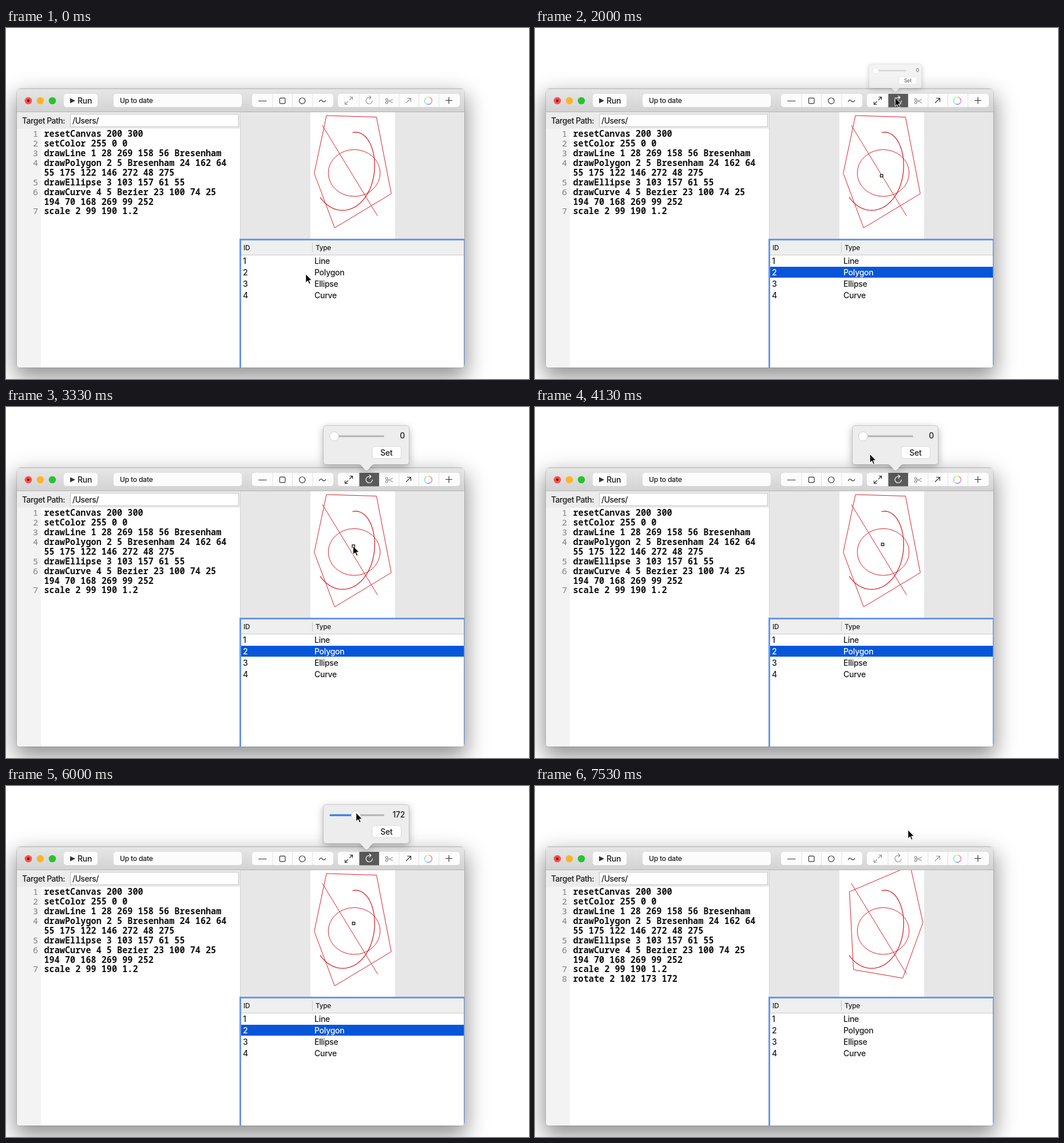
An HTML page for the animation above (8270 ms loop, 914 px wide and 613 px high).

```html
<!DOCTYPE html>
<html lang="en">
<head>
<meta charset="utf-8">
<title>Rotate a polygon</title>
<style>
  html, body { margin: 0; width: 100%; height: 100%; overflow: hidden; background: #fff; }
  svg { display: block; position: absolute; left: 0; top: 0; }
  text { font: 450 14px Inter, sans-serif; letter-spacing: -.02em; fill: #1c1c1c; white-space: pre; }
  .small { font-size: 12.2px; }
  .head { font-size: 11.7px; }
  .label { letter-spacing: -.035em; }
  .code text { font: 600 15.2px "Noto Sans Mono", monospace; letter-spacing: 0; fill: #101010; }
  .code .num { fill: #808080; font-weight: 500; }
  .end { text-anchor: end; }
  .mid { text-anchor: middle; }
  .window { position: absolute; left: 19px; top: 106px; width: 782px; height: 487px; border-radius: 6px;
    box-shadow: 0 0 0 .6px rgba(0,0,0,.22), 0 15px 37px 4px rgba(0,0,0,.42); }
  .button { fill: #fcfcfc; filter: drop-shadow(0 .6px .5px rgba(0,0,0,.3)); }
  .icon { fill: none; stroke: #333; stroke-width: 1.2; stroke-linecap: round; stroke-linejoin: round; }
  .drawing * { fill: none; stroke: #dc1f26; stroke-width: 1; vector-effect: non-scaling-stroke; }
  .bubble { fill: #ededed; stroke: rgba(0,0,0,.2); stroke-width: .8; filter: drop-shadow(0 4px 7px rgba(0,0,0,.3)); }
</style>
</head>
<body>
<div class="window"></div>
<svg id="stage" width="914" height="613" viewBox="0 0 914 613">
  <defs>
    <linearGradient id="bar" x2="0" y2="1"><stop stop-color="#e7e7e7"/><stop offset="1" stop-color="#d2d2d2"/></linearGradient>
    <linearGradient id="blue" x2="0" y2="1"><stop stop-color="#4d90f3"/><stop offset="1" stop-color="#1d62dd"/></linearGradient>
    <clipPath id="frame"><rect x="19" y="106" width="782" height="487" rx="5.5"/></clipPath>
    <clipPath id="paper"><rect x="532" y="147" width="148" height="221"/></clipPath>
  </defs>

  <g clip-path="url(#frame)">
    <rect x="19" y="106" width="782" height="487" fill="#fff"/>
    <rect x="19" y="106" width="782" height="41" fill="url(#bar)"/>
    <path d="M22 106.5H798" stroke="#c4c4c4"/>
    <rect x="19" y="147" width="391" height="29" fill="#ececec"/>
    <rect x="19" y="176" width="42" height="417" fill="#f3f3f3"/>
    <rect x="410" y="147" width="391" height="222" fill="#e7e7e7"/>
    <path d="M409.5 147V593" stroke="#d2d2d2"/>
    <path d="M19 146.5H801" stroke="#b4b4b4"/>

    <circle cx="39" cy="127" r="6.3" fill="#fc4f4c"/><circle cx="39" cy="127" r="2.2" fill="#740806"/>
    <circle cx="60" cy="127" r="6.3" fill="#fdb42c"/>
    <circle cx="81" cy="127" r="6.3" fill="#28c232"/>

    <g class="button">
      <rect x="101" y="115" width="59" height="23" rx="4"/>
      <rect x="188" y="115" width="224" height="23" rx="4"/>
      <rect x="430" y="115" width="142" height="23" rx="4"/>
      <rect x="580" y="115" width="213" height="23" rx="4"/>
    </g>
    <path d="M466 115V138M500.5 115V138M536 115V138M617 115V138M652 115V138M687 115V138M721.5 115V138M756.5 115V138" stroke="#e2e2e2"/>
    <path d="M112 122.5L121 127L112 131.5Z" fill="#333"/>
    <text x="125" y="132">Run</text>
    <text id="status" class="small" x="199" y="131.3"></text>

    <g id="tools" class="icon">
      <path d="M441.5 127.5H455"/>
      <rect x="478.3" y="122.3" width="9.6" height="9.6" rx="1.5"/>
      <circle cx="517.7" cy="127.2" r="5.2"/>
      <path d="M547.5 128.5C549.5 124.5 551.5 126 553 127.5S556.8 130 558.8 126.5"/>
      <path d="M768.5 126.5H779.5M774 121V132"/>
      <g id="wheel" stroke-width="1.8" stroke-linecap="butt"></g>
    </g>
    <rect id="pressed" x="617.5" y="115" width="34.5" height="23.5" fill="#5a5a5a"/>
    <g id="edit" class="icon">
      <path d="M600.5 125.5L605 121M601 120.5H605.5V125M597.5 128.5L593 133M592.5 129V133.5H597"/>
      <path d="M699.5 130.5L707 123M701.5 122.5H707.5V128.5"/>
    </g>
    <g id="turn" class="icon"><path d="M640.3 127A5.6 5.6 0 1 1 634.8 121.3H637.5M635 118.5L638 121.3L635 124.2"/></g>
    <g class="icon" opacity=".5">
      <circle cx="665.3" cy="124.8" r="1.9"/><circle cx="665.3" cy="130.2" r="1.9"/>
      <path d="M667 125.7L675.5 130.5M667 129.3L675.5 124.5"/>
    </g>

    <text class="label" x="28" y="166.5">Target Path:</text>
    <rect x="112.5" y="150.5" width="294" height="22" fill="#fff" stroke="#c3c3c3"/>
    <text class="label" x="116" y="166.5">/Users/</text>
    <g id="code" class="code"></g>

    <rect x="532" y="147" width="148" height="222" fill="#fff"/>
    <g clip-path="url(#paper)"><g class="drawing" transform="translate(532 369.9) scale(.743 -.743)">
      <path d="M28 269L158 56"/>
      <polygon id="polygon" points="24,162 64,55 175,122 146,272 48,275"/>
      <ellipse cx="103" cy="157" rx="61" ry="55"/>
      <path id="curve" style="stroke-width:1.3"/>
    </g></g>
    <rect id="anchor" x="-2.2" y="-2.2" width="4.4" height="4.4" fill="#fff" stroke="#111" stroke-width="1.3"/>
    <g id="veil">
      <rect x="410" y="147" width="391" height="222" fill="#000" opacity=".21"/>
      <text class="mid" x="605.3" y="263">Update Required</text>
    </g>

    <rect x="410" y="369" width="391" height="224" fill="#fff"/>
    <rect x="410" y="370" width="391" height="26" fill="#efefef"/>
    <path d="M410 396.5H801M535.5 375V392" stroke="#c9c9c9"/>
    <text class="head" x="415" y="387.5">ID</text>
    <text class="head" x="541" y="387.5">Type</text>
    <g id="rows"></g>
    <rect x="409.5" y="369.5" width="392" height="240" fill="none" stroke="#6797eb" stroke-width="3"/>
  </g>

  <g id="popover">
    <path class="bubble" d="M560 32.5H699Q704.5 32.5 704.5 38V95Q704.5 100.5 699 100.5H643C638 100.5 634 111.5 630 111.5S622 100.5 617 100.5H560Q554.5 100.5 554.5 95V38Q554.5 32.5 560 32.5Z"/>
    <path d="M567 51H659.5" stroke="#b3b3b3" stroke-width="3" stroke-linecap="round"/>
    <path id="fill" stroke="#307bf3" stroke-width="3" stroke-linecap="round"/>
    <circle id="knob" cy="51.3" r="8" fill="#fff" stroke="#c6c6c6" stroke-width=".8"/>
    <text id="value" class="end" x="697" y="55"></text>
    <rect id="setBox" x="640" y="69" width="50.5" height="21" rx="4" stroke-width=".8"/>
    <text id="setText" class="mid" x="664.8" y="84.5">Set</text>
  </g>

  <path id="cursor" d="M-.7 -.5V14.8L2.9 11.5L5.3 17.1L7.7 16.1L5.3 10.7H9.9Z" fill="#000" stroke="#fff" stroke-width="1"/>
</svg>

<script>
const LOOP = 8270, STEP = 200 / 3;
const SELECT = 200, OPEN = 1930, GRAB = 2870, DRAG_END = 3400,
      SLIDE = 4470, PRESS = 6600, OUTDATED = 6730, UPDATED = 6930, CLOSED = 7060;

const cursorKeys = [
  [870, 524.5, 430], [1130, 560, 310], [1400, 627, 103], [1660, 630, 122], [2130, 630, 122],
  [2400, 616, 185], [2600, 610, 222], [GRAB, 606, 258], [3000, 606, 258], [DRAG_END, 607.5, 240],
  [3660, 607, 232], [3930, 594, 130], [4130, 586, 83], [4400, 574, 48], [SLIDE, 574, 48],
  [4800, 580, 48], [5400, 604, 47], [5860, 612.5, 47], [6130, 612.5, 47], [6300, 633, 61], [6530, 652.5, 77]
];
const popoverKeys = [
  [OPEN - 60, .3, 0], [OPEN, .38, .25], [2000, .615, .62], [2066, .95, .9], [2133, 1.04, 1], [2260, 1, 1],
  [6860, 1, 1], [CLOSED, 1, 0]
];

const $ = id => document.getElementById(id);
const set = (id, attrs) => { for (const k in attrs) $(id).setAttribute(k, attrs[k]); };
const show = (id, on) => { $(id).style.display = on ? "" : "none"; };

function sample(keys, t) {
  const next = keys.findIndex(k => k[0] > t);
  if (next === 0) return keys[0].slice(1);
  if (next < 0) return keys[keys.length - 1].slice(1);
  const a = keys[next - 1], b = keys[next], p = (t - a[0]) / (b[0] - a[0]);
  return a.slice(1).map((v, i) => v + (b[i + 1] - v) * p);
}

function bezierPoint(points, u) {
  while (points.length > 1)
    points = points.slice(1).map((p, i) => p.map((v, k) => points[i][k] * (1 - u) + v * u));
  return points[0];
}

function build() {
  const control = [[23, 100], [74, 25], [194, 70], [168, 269], [99, 252]];
  set("curve", { d: "M" + Array.from({ length: 61 }, (_, i) => bezierPoint(control, i / 60).join(" ")).join("L") });

  const lines = [
    "1|resetCanvas 200 300", "2|setColor 255 0 0", "3|drawLine 1 28 269 158 56 Bresenham",
    "4|drawPolygon 2 5 Bresenham 24 162 64", "|55 175 122 146 272 48 275",
    "5|drawEllipse 3 103 157 61 55", "6|drawCurve 4 5 Bezier 23 100 74 25",
    "|194 70 168 269 99 252", "7|scale 2 99 190 1.2", "8|rotate 2 102 173 172"
  ];
  $("code").innerHTML = lines.map((line, i) => {
    const [num, code] = line.split("|"), y = 190.2 + i * 16.9;
    return `<g><text class="num end" x="56" y="${y}">${num}</text><text x="66.5" y="${y}">${code}</text></g>`;
  }).join("");
  $("code").lastChild.id = "newLine";

  $("rows").innerHTML = '<rect id="selection" x="411" y="417" width="390" height="19" fill="#0756d9"/>' +
    ["Line", "Polygon", "Ellipse", "Curve"].map((type, i) => {
      const y = 412 + i * 20;
      return `<g id="row${i}"><text x="414" y="${y}">${i + 1}</text><text x="539" y="${y}">${type}</text></g>`;
    }).join("");

  const rim = a => `${738 + 6.4 * Math.sin(a)} ${127 - 6.4 * Math.cos(a)}`;
  $("wheel").innerHTML = Array.from({ length: 18 }, (_, i) => {
    const a = i * Math.PI / 9;
    return `<path d="M${rim(a)}A6.4 6.4 0 0 1 ${rim(a + .37)}" stroke="hsl(${40 - i * 20} 75% 75%)"/>`;
  }).join("");
}

function render(t) {
  const selected = t >= SELECT && t < OUTDATED;
  const outdated = t >= OUTDATED && t < UPDATED;
  const [x, y] = sample(cursorKeys, t);
  set("cursor", { transform: `translate(${x} ${y})` });

  $("status").textContent = outdated ? "Update is required" : "Up to date";
  set("tools", { opacity: outdated ? .45 : 1 });
  set("edit", { opacity: selected ? 1 : .5 });
  const active = t >= 1860 && selected;
  show("pressed", active);
  set("turn", { opacity: selected ? 1 : .5 });
  $("turn").style.stroke = active ? "#fff" : "";

  show("newLine", t >= OUTDATED);
  show("rows", !outdated);
  show("selection", selected);
  for (const cell of $("row1").children) cell.style.fill = selected ? "#fff" : "";

  show("veil", outdated);
  set("polygon", { transform: (t >= UPDATED ? "rotate(172 102 173) " : "") +
    "translate(99 190) scale(1.2) translate(-99 -190)" });
  show("anchor", t >= OPEN && selected);
  const [ax, ay] = sample([[3000, 605.7, 258], [DRAG_END, 607.5, 240]], t);
  set("anchor", { transform: `translate(${ax} ${ay})` });

  const [scale, opacity] = sample(popoverKeys, t);
  show("popover", t >= OPEN && t < CLOSED);
  set("popover", { opacity, transform: `translate(630 112) scale(${scale}) translate(-630 -112)` });
  const progress = t < SLIDE ? 0 : Math.min(1, (x - 574) / 38.5);
  const knob = 573.5 + 38 * progress;
  set("knob", { cx: knob });
  set("fill", { d: `M567 51H${knob}` });
  $("value").textContent = Math.round(172 * progress);
  const pressed = t >= PRESS;
  set("setBox", { fill: pressed ? "url(#blue)" : "#fff", stroke: pressed ? "none" : "#d0d0d0" });
  $("setText").style.fill = pressed ? "#fff" : "";
}

build();
const start = performance.now();
function frame() {
  const t = (performance.now() - start) % LOOP;
  render(Math.floor((t + 4) / STEP) * STEP);
  requestAnimationFrame(frame);
}
frame();
</script>
</body>
</html>
```
